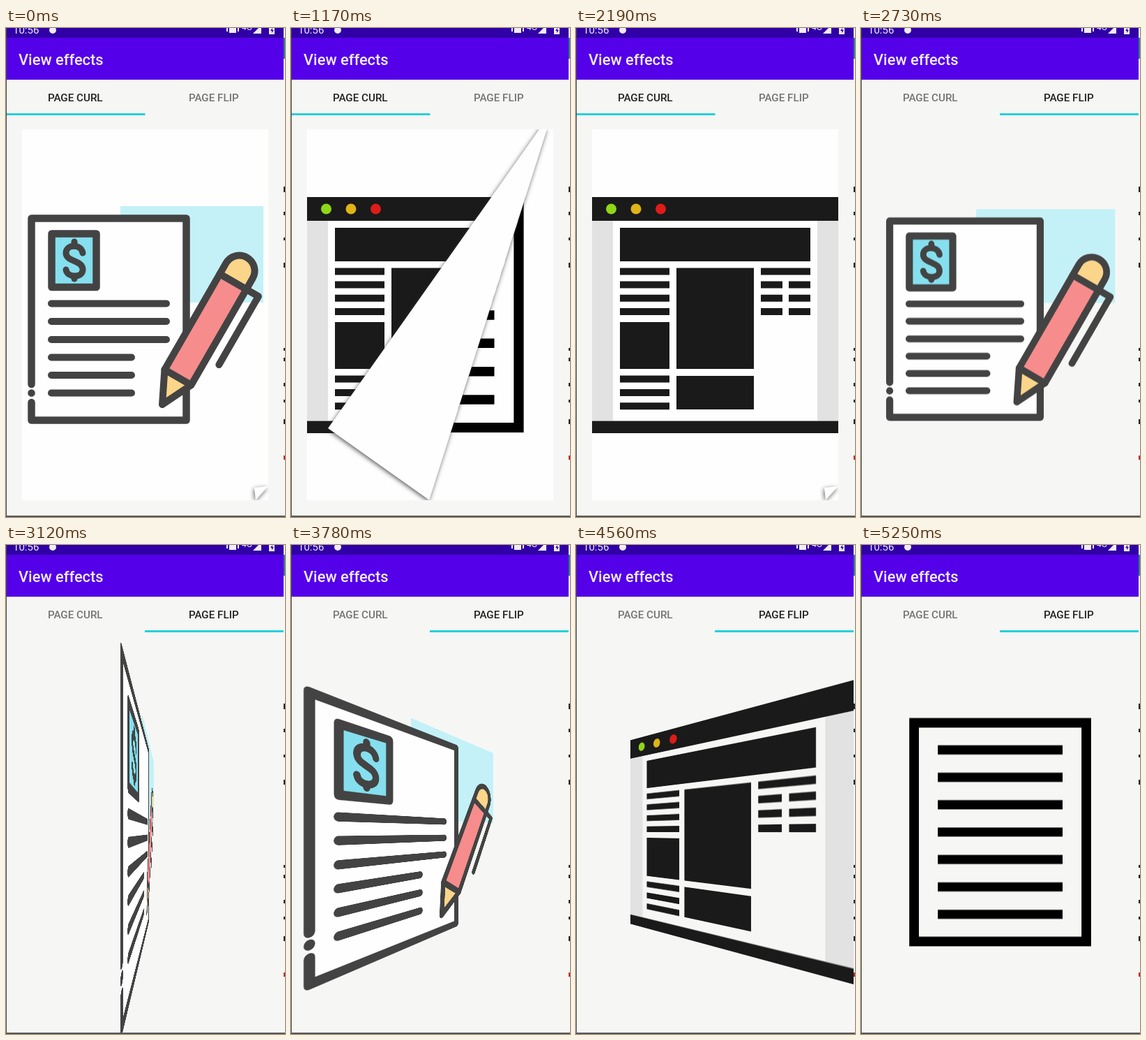
An HTML page without scripts for the animation above (5280 ms loop, 400x700 px).

```html
<!DOCTYPE html>
<html lang="en">
<head>
<meta charset="utf-8">
<title>View effects</title>
<style>
@property --x { syntax: '<number>'; inherits: true; initial-value: 20; }
@property --y { syntax: '<number>'; inherits: true; initial-value: 18; }
@property --r { syntax: '<number>'; inherits: true; initial-value: 0; }

html, body { margin: 0; width: 100%; height: 100%; overflow: hidden; background: #f6f7f4; }
.stage { position: relative; width: 400px; height: 700px; overflow: hidden; background: #f6f7f4; font-family: Roboto, sans-serif; }
.stage *, .stage { box-sizing: border-box; }
.strip, .card, .card > *, .card svg, .flip, .flip svg, .chrome { position: absolute; }

.pager { position: absolute; left: 0; top: 125px; width: 398px; height: 573px; overflow: hidden; }
.strip { inset: 0; animation: slide 5.28s infinite; }
.card { left: 23px; top: 20px; width: 353px; height: 531px; overflow: hidden; background: #fefefe; animation: curl 5.28s linear infinite; }
.card > *, .card svg { left: 0; top: 0; width: 353px; height: 531px; }

/* --x, --y: distance of the pulled corner from its rest place; the fold is the bisector */
.page, .flap {
  --s: calc(var(--x) * var(--x) + var(--y) * var(--y));
  --low: calc((353 - var(--s) / 2 / var(--x)) * 1px);
  --top: calc((353 - var(--s) / 2 / var(--x) + 531 * var(--y) / var(--x)) * 1px);
  background: #fefefe;
}
.page { clip-path: polygon(-3000px 0, var(--top) 0, var(--low) 531px, -3000px 531px); }
.shade { filter: drop-shadow(-1px 2px 3px rgba(40, 40, 40, .75)); }
.flap {
  position: absolute; width: 353px; height: 531px;
  clip-path: polygon(var(--top) 0, 3000px 0, 3000px 531px, var(--low) 531px);
  transform-origin: 100% 100%;
  --c: calc((var(--y) * var(--y) - var(--x) * var(--x)) / var(--s));
  --k: calc(-2 * var(--x) * var(--y) / var(--s));
  transform: matrix(var(--c), var(--k), var(--k), calc(-1 * var(--c)), calc(-1 * var(--x)), calc(-1 * var(--y)));
}
.first { animation: leave 5.28s infinite; }
.then { animation: enter 5.28s infinite; }

/* each sheet shows only within a quarter turn of facing front */
.flip { left: 399px; top: 0; width: 398px; height: 573px; animation: turn 5.28s linear infinite; }
.flip svg {
  --a: calc(var(--r) - 180 * var(--i));
  left: 23px; top: 20px; width: 353px; height: 531px; overflow: visible;
  opacity: calc(90 - max(var(--a), -1 * var(--a)));
  transform: perspective(328px) rotateY(calc(var(--a) * 1deg)) scale(.972);
}

.chrome { left: 0; top: 0; }
.title { font-size: 21.8px; font-weight: 500; fill: #f2ecfd; }
.tab { font-size: 15.2px; font-weight: 500; }
.t1 { animation: dim 5.28s infinite; }
.t2 { animation: lit 5.28s infinite; }
.bar { animation: bar 5.28s infinite; }

@keyframes curl {
  0%, .6% { --x: 20; --y: 18; }
  4% { --x: 200; --y: 105; }
  7% { --x: 470; --y: 75; }
  10% { --x: 740; --y: 0; }
  10.01%, 12.5% { --x: 20; --y: 18; }
  17% { --x: 150; --y: 90; }
  22.16% { --x: 322; --y: 103; }
  26% { --x: 560; --y: 55; }
  28.4%, 29.5% { --x: 740; --y: 0; }
  34% { --x: 480; --y: 75; }
  38% { --x: 200; --y: 105; }
  40.5%, 100% { --x: 20; --y: 18; }
}
@keyframes turn {
  0%, 53.5% { --r: 0; }
  59.09% { --r: 83.2; }
  63%, 65% { --r: 180; }
  69.1% { --r: 90; }
  71.59% { --r: 43; }
  76.5%, 79% { --r: 0; }
  80.11% { --r: 16; }
  84% { --r: 110; }
  88%, 90% { --r: 180; }
  93.2% { --r: 240; }
  96% { --r: 300; }
  99%, 100% { --r: 360; }
}
@keyframes slide { 0%, 43.5% { transform: none; } 49%, 100% { transform: translateX(-399px); } }
@keyframes bar { 0%, 43.5% { transform: none; } 49%, 100% { transform: translateX(199px); } }
@keyframes leave { 0%, 10% { opacity: 1; } 10.01%, 100% { opacity: 0; } }
@keyframes enter { 0%, 10% { opacity: 0; } 10.01%, 100% { opacity: 1; } }
@keyframes dim { 0%, 43.5% { fill: #222; } 47%, 100% { fill: #757575; } }
@keyframes lit { 0%, 43.5% { fill: #757575; } 47%, 100% { fill: #222; } }
</style>
</head>
<body>
<svg width="0" height="0" style="position:absolute">
  <symbol id="note" viewBox="23 145 353 531">
    <path d="M164 255H369V393H164Z" fill="#c3f1f7"/>
    <g fill="none" stroke="#434343" stroke-width="10.5" stroke-linecap="round" stroke-linejoin="round">
      <path d="M36.5 272.5H258.5V561.5H36.5Z" fill="#fefefe" stroke="none"/>
      <path d="M36.5 510V272.5H258.5V561.5H36.5V536M36.5 522.5v.1"/>
      <path d="M65.5 294.5H129.5V371H65.5Z" fill="#85dfee"/>
      <path d="M110 322C108 309 86 309 86 322C86 335 110 332 110 346C110 358 88 358 86 346M98 306V311M98 357V359" stroke-width="9"/>
      <path d="M65 394.5H230M65 420H230M65 446H230M65 471.5H180M65 497H180M65 522.5H180" stroke-width="10"/>
      <g transform="translate(224 539) rotate(30)" stroke-width="10">
        <path d="M22-203H42V-90"/>
        <path d="M0 0L-22-45H22Z" fill="#fbd589"/>
        <path d="M-22-203V-221A22 22 0 0 1 22-221V-203Z" fill="#fbd589"/>
        <path d="M-22-45H22V-203H-22Z" fill="#f78c8c"/>
      </g>
    </g>
  </symbol>
  <symbol id="web" viewBox="23 145 353 531">
    <path d="M23 276h30v286h-30zM346 276h30v286h-30z" fill="#e2e2e2"/>
    <g fill="#1a1a1a">
      <path d="M23 242H376V276H23ZM23 562.5H376V580H23ZM63 286H336V334H63ZM63 421H134V488H63ZM144 343.5H255V488H144ZM144 498H255V546H144Z"/>
      <path d="M63 343.5h71v10h-71zm0 19h71v10h-71zm0 19.3h71v10h-71zm0 19.3h71v10h-71zm0 96.5h71v10h-71zm0 19.3h71v10h-71zm0 19.3h71v10h-71z"/>
      <path d="M265 343.5h71v10h-71zm0 19h31v10h-31zm0 19.3h31v10h-31zm0 19.3h31v10h-31zM305 362.5h31v10h-31zm0 19.3h31v10h-31zm0 19.3h31v10h-31z"/>
    </g>
    <circle cx="50.5" cy="259" r="7.5" fill="#90d618"/>
    <circle cx="86" cy="259" r="7.5" fill="#e0b418"/>
    <circle cx="121.5" cy="259" r="7.5" fill="#de1c18"/>
  </symbol>
  <symbol id="doc" viewBox="23 145 353 531">
    <g fill="none" stroke="#000">
      <path d="M72.5 250H326.5V572H72.5Z" stroke-width="14.2"/>
      <path d="M199.5 283.2V545" stroke-width="184" stroke-dasharray="13.5 26.85"/>
    </g>
  </symbol>
</svg>

<div class="stage">
  <div class="pager">
    <div class="strip">
      <div class="card">
        <div class="under">
          <svg class="first"><use href="#web"/></svg>
          <svg class="then"><use href="#doc"/></svg>
        </div>
        <div class="page">
          <svg class="first"><use href="#note"/></svg>
          <svg class="then"><use href="#web"/></svg>
        </div>
        <div class="shade"><div class="flap"></div></div>
      </div>
      <div class="flip">
        <svg style="--i:0"><use href="#note"/></svg>
        <svg style="--i:1"><use href="#web"/></svg>
        <svg style="--i:2"><use href="#doc"/></svg>
      </div>
    </div>
  </div>

  <svg class="chrome" width="400" height="700">
    <path d="M0 0H398V14H0Z" fill="#3000a6"/>
    <path d="M0 14H398V74H0Z" fill="#5400e8"/>
    <g fill="#f0ecfa">
      <text x="10" y="8" font-size="15">10:56</text>
      <circle cx="67" cy="3" r="5"/>
      <path d="M320 0h10v7h-10zM316 0h2v5h-2zM332 0h2v5h-2zM354 8L366-4V8ZM377 0h8v9h-8z"/>
      <text x="338" y="3" font-size="12">4G</text>
    </g>
    <path d="M382 0l-3 4h2v3l3-4h-2z" fill="#3000a6"/>
    <text class="title" x="18" y="52.5">View effects</text>
    <text class="tab t1" x="60" y="105">PAGE CURL</text>
    <text class="tab t2" x="262" y="105">PAGE FLIP</text>
    <path class="bar" d="M0 122H199.5V125H0Z" fill="#26d0da"/>
    <path d="M398 0h2v700h-2z" fill="#f6f6f6"/>
    <path d="M398 14h2v30h-2z" fill="#2b7d8c"/>
    <path d="M399 227v8M399 263v5M399 300v4M399 336v7M399 458v4M399 472v5M399 508v5M399 532v4M399 560v7" stroke="#222" stroke-width="2"/>
    <path d="M399 612v6" stroke="#c22" stroke-width="2"/>
    <path d="M.5 0V700" stroke="#454545"/>
    <path d="M0 699H400" stroke="#555" stroke-width="2"/>
  </svg>
</div>
</body>
</html>
```
